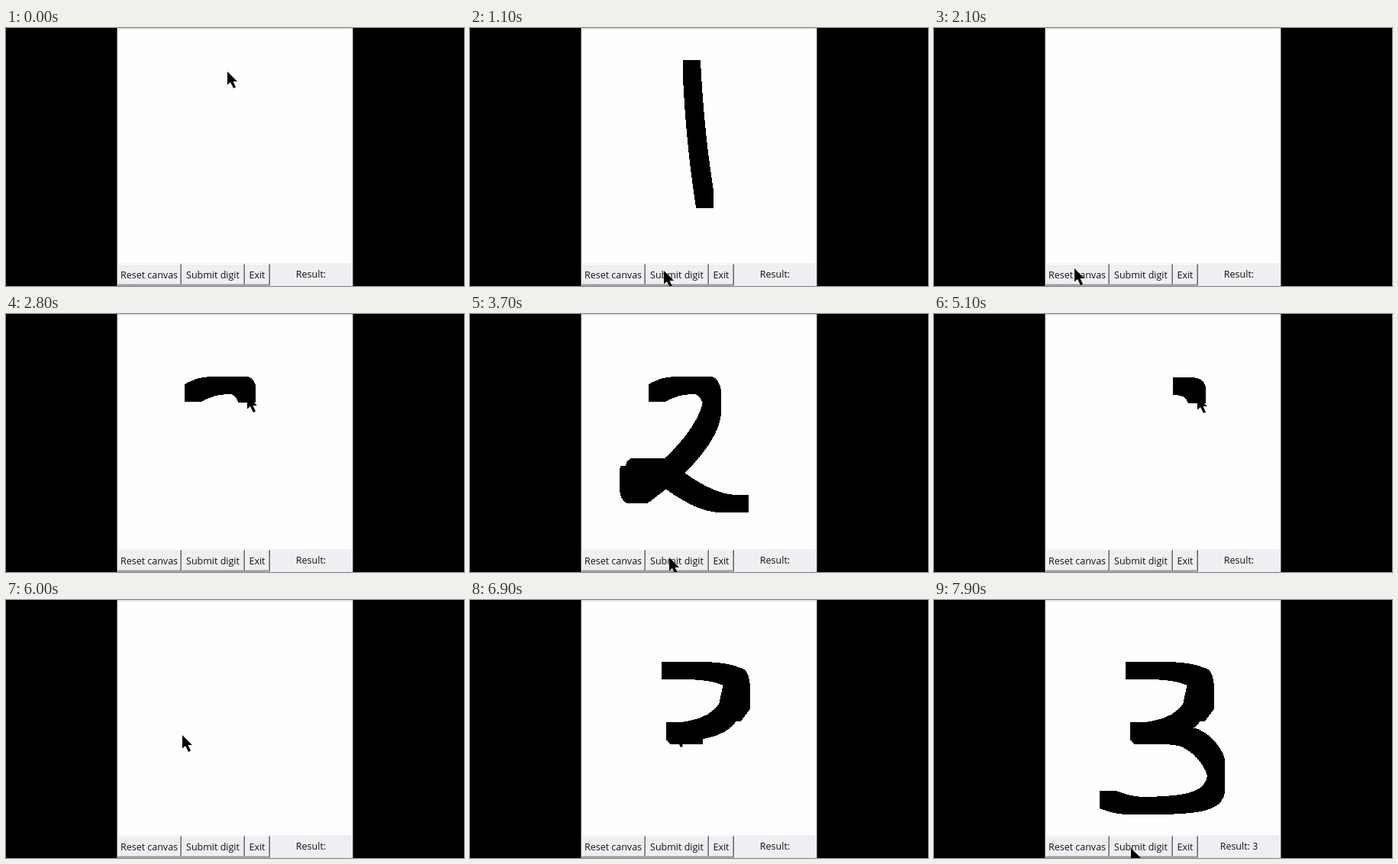
An HTML page with a canvas for the animation above (8000 ms loop, 600 px wide and 338 px high).

```html
<!DOCTYPE html>
<html lang="en">
<head>
<meta charset="utf-8">
<title>Digit canvas</title>
<style>
  html, body { margin: 0; width: 100%; height: 100%; overflow: hidden; background: #000; }
  svg, canvas { position: absolute; left: 0; top: 0; width: 600px; height: 338px; }
  canvas { filter: blur(.4px); }
  text { font: 12.5px "Open Sans", "Noto Sans", sans-serif; text-anchor: middle; fill: #111; }
</style>
</head>
<body>
<svg viewBox="0 0 600 338">
  <rect width="600" height="338"/>
  <rect x="145.6" width="308.8" height="338" fill="#f0eef2"/>
  <rect x="146" y="1" width="307.5" height="307" fill="#fefefe"/>
  <rect x="146" width="308" height="1.5" fill="#dcdce4"/>
  <g id="buttons"></g>
  <text id="result" x="399.5" y="327">Result:</text>
</svg>
<canvas id="ink" width="600" height="338"></canvas>
<svg viewBox="0 0 600 338">
  <path id="cursor" d="M0 0V17.5L4 14L8 22L11 20.5L7.5 13H13Z"/>
</svg>
<script>
const LOOP = 8000, STEP = 100, BRUSH = 23, LEAD = 4;
const $ = id => document.getElementById(id);
const ctx = $('ink').getContext('2d');

const button = (label, l, r) => `
  <path d="M${l + .5} 337V309.5H${r - 1}" fill="none" stroke="#fff"/>
  <path d="M${l + 1} 336H${r - 1.5}V310" fill="none" stroke="#a5a3a8"/>
  <path d="M${l} 337H${r - .5}V309" fill="none" stroke="#66646a"/>
  <text x="${(l + r - 1) / 2}" y="328">${label}</text>`;
$('buttons').innerHTML =
  button('Reset canvas', 146, 230) + button('Submit digit', 230, 313) + button('Exit', 313, 346);

// Points one pixel apart along an SVG path
function trace(d) {
  const path = document.createElementNS('http://www.w3.org/2000/svg', 'path');
  path.setAttribute('d', d);
  return Array.from({ length: Math.ceil(path.getTotalLength()) + 1 }, (_, i) => {
    const p = path.getPointAtLength(i);
    return [p.x, p.y];
  });
}

const one = trace('M290 53Q294 140 307 224');
const two = trace('M245 103C256 96 268 93 285 93H303C312 93 317 104 317 114' +
  'C318 142 292 174 271 195C255 210 240 222 221 236H216' +
  'C205 230 207 214 208 210L214 213Q216 200 224 200H243C262 212 300 248 340 248H353');
const slip = trace('M324 94Q337 94 342 101C356 126 330 174 272 174');
const threeTop = trace('M262 92H295Q332 93 349 103Q355 110 355 131L343 147V120L337 147' +
  'C327 161 306 172 268 172L293 177H273L268 171');
const threeEnd = trace('M268 171L290 177Q322 176 334 180C350 186 369 208 369 222V236' +
  'C369 262 345 268 285 269H262Q240 267 228 261');

const draw = (from, to, points, power = 1.6) => ({ from, to, points, power });
const go = (from, to, target) => ({ from, to, target });
const show = (from, digit) => ({ from, digit });
const clear = from => ({ from, digit: '', wipe: true });

const script = [
  go(0, 100, one[0]), draw(200, 500, one),
  go(600, 1200, [250, 325]), show(1400, ' 1'),
  go(1500, 1800, [187, 326]), clear(2000),
  go(1900, 2100, [184, 315]), go(2100, 2500, two[0]), draw(2500, 3400, two),
  go(3400, 3700, [261, 319]), show(3800, ' 2'),
  go(3800, 4100, [176, 309]), clear(4400),
  go(4400, 4900, slip[0]), draw(5000, 5300, slip),
  go(5500, 5700, [182, 307]), clear(5800),
  go(5800, 6150, threeTop[0]), draw(6150, 6900, threeTop), draw(6900, 7400, threeEnd, 1),
  go(7400, 7800, [258, 325]), show(7800, ' 3')
];

function render(t) {
  let pos = [290, 57], result = '';
  ctx.clearRect(0, 0, 600, 338);
  for (const { from, to, points, power, target, digit, wipe } of script) {
    if (t < from || t === from && points) continue;
    const u = Math.min(1, (t - from) / (to - from));
    if (points) {
      const last = points.length - 1, end = Math.round(last * u ** power);
      for (const [x, y] of points.slice(0, end + 1))
        ctx.fillRect(Math.round(x) - 11, Math.round(y) - 11, BRUSH, BRUSH);
      pos = points[Math.min(last, end + LEAD)];
    } else if (target) {
      const k = u * u * (3 - 2 * u);
      pos = pos.map((v, i) => v + (target[i] - v) * k);
    } else {
      result = digit;
      if (wipe) ctx.clearRect(0, 0, 600, 338);
    }
  }
  $('cursor').setAttribute('transform', `translate(${pos.map(Math.round)})`);
  $('result').textContent = 'Result:' + result;
}

const start = performance.now();
let shown = -1;
function tick() {
  const t = Math.floor((performance.now() - start) % LOOP / STEP) * STEP;
  if (t !== shown) render(shown = t);
  requestAnimationFrame(tick);
}
tick();
</script>
</body>
</html>
```
